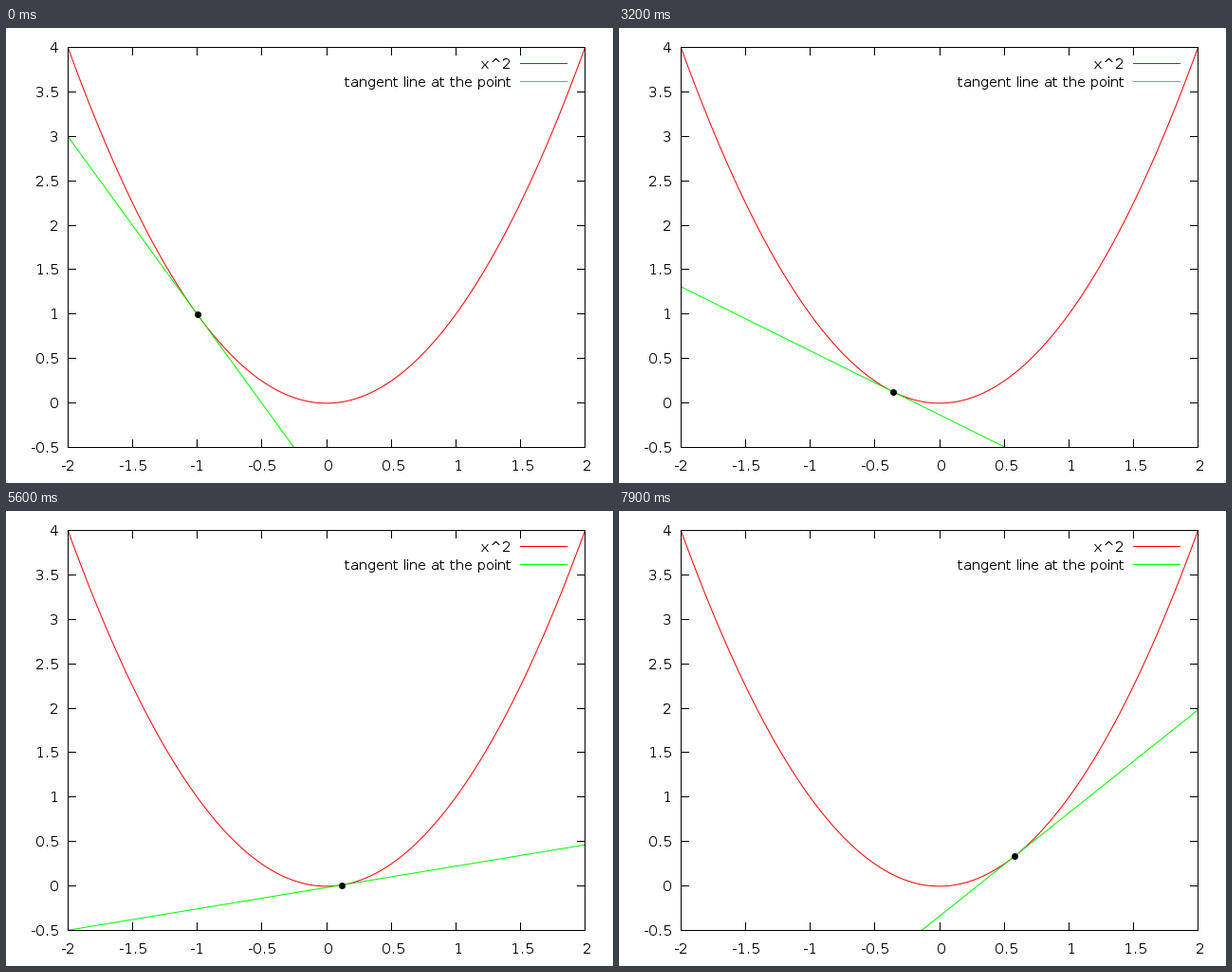
Recreate the animation shown at these times as a matplotlib script. Size 640 by 480 pixels, loop 8 s.

```python
import numpy as np
import matplotlib.pyplot as plt
from matplotlib.animation import FuncAnimation

W, H, DPI = 640, 480, 80
PX = 72 / DPI                       # one pixel in points
LEFT, RIGHT, TOP, BOTTOM = 65, 610, 20, 442
TICK = 8.5
DX, DY = -0.1, 0.25                 # sub-pixel offset of the plotted data
FRAMES, INTERVAL = 80, 100
RED, GREEN = "#ff0000", "#00ff00"

# whole-pixel glyph hinting
plt.rcParams.update({"font.family": "DejaVu Sans", "font.size": 15 * PX,
                     "text.hinting": "default", "text.hinting_factor": 1})

fig = plt.figure(figsize=(W / DPI, H / DPI), dpi=DPI, facecolor="white")
ax = fig.add_axes([0, 0, 1, 1])
ax.set_xlim(-0.5, W - 0.5)
ax.set_ylim(H - 0.5, -0.5)
ax.axis("off")


def sx(x):
    return LEFT + (x + 2) / 4 * (RIGHT - LEFT)


def sy(y):
    return BOTTOM - (y + 0.5) / 4.5 * (BOTTOM - TOP)


def data(x, y):
    return sx(x) + DX, sy(y) + DY


def stroke(xs, ys, color="black", z=5):
    return ax.plot(xs, ys, color=color, lw=PX, zorder=z, snap=False,
                   solid_capstyle="butt", solid_joinstyle="round")[0]


def label(x, y, s, ha):
    ax.text(x, y, s, ha=ha, va="baseline")


def draw_frame():
    ax.add_patch(plt.Rectangle((LEFT, TOP), RIGHT - LEFT, BOTTOM - TOP,
                               fill=False, lw=PX, snap=False, zorder=5))
    for v in np.arange(-2, 2.1, 0.5):
        x = round(sx(v))
        stroke([x, x], [BOTTOM, BOTTOM - TICK])
        stroke([x, x], [TOP, TOP + TICK])
        label(sx(v), 466.5, f"{v: g}", "center")
    for v in np.arange(-0.5, 4.1, 0.5):
        y = round(sy(v))
        stroke([LEFT, LEFT + TICK], [y, y])
        stroke([RIGHT, RIGHT - TICK], [y, y])
        label(55.5, y + 5.5, f"{v:g}", "right")


def draw_key(y, text, color):
    label(532.5, y + 5.5, text, "right")
    stroke([541.5, 591.5], [y, y], color)


draw_frame()
draw_key(37, "x^2", RED)
draw_key(56, "tangent line at the point", GREEN)

xs = np.linspace(-2, 2, 100)
stroke(*data(xs, xs ** 2), RED, 2)
tangent = stroke([], [], GREEN, 3)
dot, = ax.plot([], [], "o", color="black", ms=7 * PX, mew=0, zorder=6,
               snap=False)


def update(i):
    a = -1 + 0.02 * i
    ends = np.array([-2.0, 2.0])
    # cut the line where it leaves through the bottom edge
    if a < 0:
        ends[1] = min(2, (a * a - 0.5) / (2 * a))
    elif a > 0:
        ends[0] = max(-2, (a * a - 0.5) / (2 * a))
    tangent.set_data(*data(ends, 2 * a * ends - a * a))
    x, y = data(a, a * a)
    dot.set_data([x], [y])
    return tangent, dot


anim = FuncAnimation(fig, update, frames=FRAMES, interval=INTERVAL,
                     repeat=True, repeat_delay=0, blit=False)
plt.show()
```
